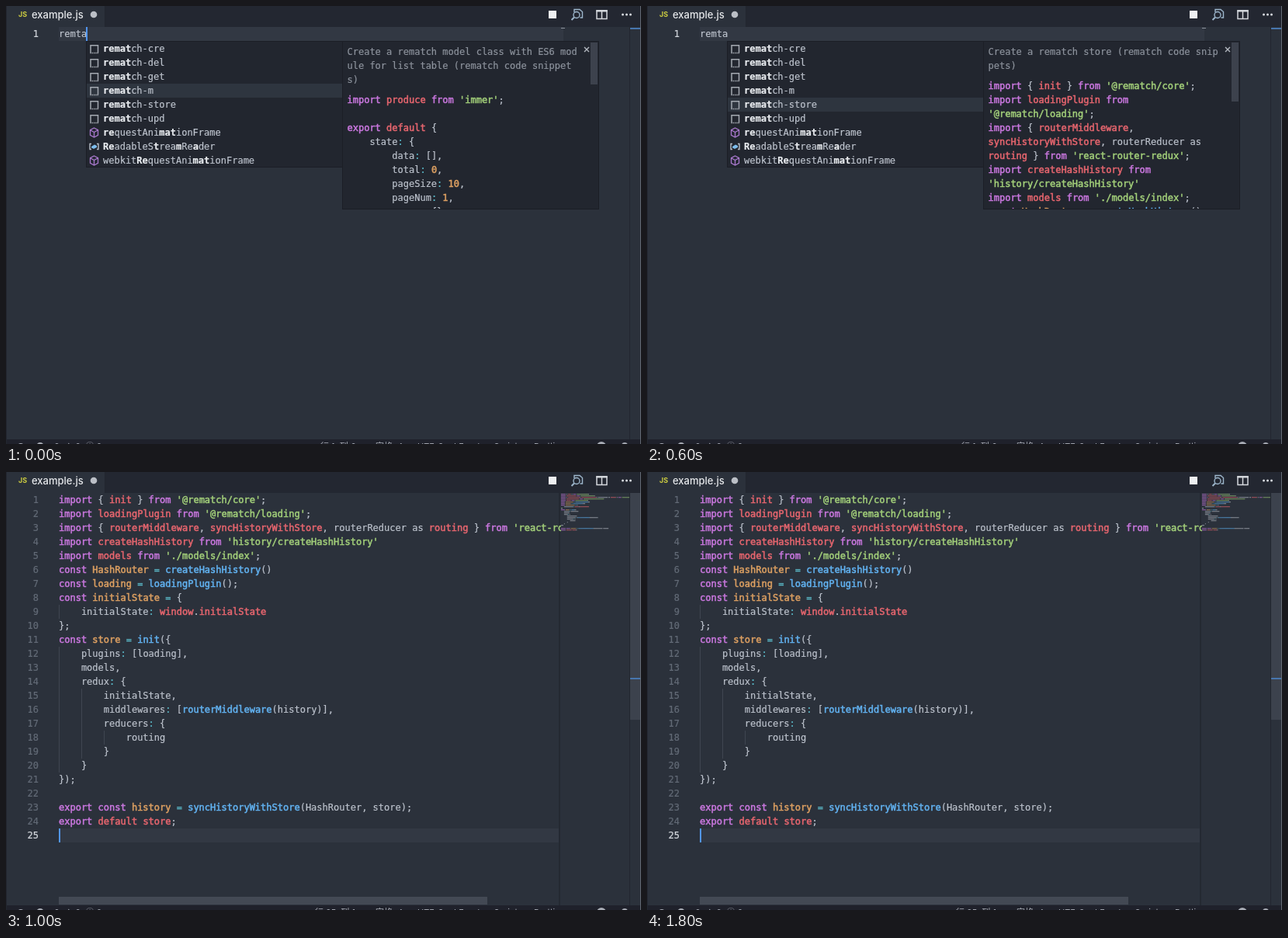
Animation, 818 px wide and 564 px high, one loop 1900 ms. Source, as an HTML page with a canvas:

```html
<!DOCTYPE html>
<html lang="en">
<head>
<meta charset="utf-8">
<title>Snippet completion</title>
<style>
  html, body { margin: 0; width: 100%; height: 100%; overflow: hidden; background: #2b313b; }
  #stage { position: relative; width: 818px; height: 564px; overflow: hidden; background: #2b313b; }
  #stage div, #stage svg, canvas, pre { position: absolute; margin: 0; }
  .layer { left: 0; top: 0; width: 818px; height: 564px; }
  pre {
    font: 12px/18px "DejaVu Sans Mono", monospace;
    color: #bdc3cd;
    -webkit-text-stroke: .2px;
  }
  .p { color: #cb78e0 } .r { color: #e8666f } .g { color: #a3d07a } .o { color: #dda062 }
  .b { color: #62b3f2 } .c { color: #5cbccb } .d { color: #8d939d }
  .p, .r, .g, .o, .b { -webkit-text-stroke: .5px; }
  .m { color: #e9ecf0; font-weight: 700 }

  #tabs { left: 127px; top: 0; width: 691px; height: 27px; background: #232731; }
  #name { left: 33px; top: 2px; font: 500 13px/18px Inter, sans-serif; color: #e6e8eb; }
  #kind { left: 16px; top: 2px; font: 700 9px/18px Inter, sans-serif; color: #cbcb41; }
  #status { left: 0; top: 558px; width: 818px; height: 6px; background: #1f212b; overflow: hidden; }
  .info { top: 560px; font: 11px/14px Inter, "Noto Sans CJK SC", "Noto Sans CJK", sans-serif; color: #a9adb6; white-space: pre; }

  .nums { left: 14px; width: 28px; top: 27px; text-align: right; color: #626a76; }
  .nums .now { color: #d3d7dd; }
  .line { left: 68px; height: 18px; background: #323843; }
  .caret { width: 2px; height: 18px; background: #5195ee; }
  .thumb { background: #434954; }
  .mark { left: 804px; width: 14px; height: 2px; background: #4776ae; }

  .box { background: #22262f; border: 1px solid #1b1e26; box-sizing: border-box; overflow: hidden; }
  #list { left: 103px; top: 45px; width: 331px; height: 163px; }
  #pick { left: 0; width: 329px; height: 18px; top: 54px; background: #2e353f; }
  #docs { left: 433px; top: 45px; width: 331px; height: 217px; }
  #docs pre { left: 5.5px; }
  #docs .thumb { left: 319px; top: 1px; width: 9px; background: #3d424d; }

  .layer, .caret, .late, .doc, #pick { animation: 1.9s step-end infinite; }
  .layer.typing { animation-name: typing; }
  .layer.result { animation-name: result; }
  #first { animation-name: first; }
  #second { animation-name: second; }
  #pick { animation-name: pick; }
  .late { animation-name: late; }
  #caret1 { animation-name: blink1; }
  #caret2 { animation-name: blink2; }
  @keyframes typing { 0% { opacity: 1 } 36.842%, 100% { opacity: 0 } }
  @keyframes result { 0% { opacity: 0 } 36.842%, 100% { opacity: 1 } }
  @keyframes first  { 0% { opacity: 1 } 5.263%, 100% { opacity: 0 } }
  @keyframes second { 0% { opacity: 0 } 5.263%, 100% { opacity: 1 } }
  @keyframes pick   { 0% { top: 54px } 5.263%, 100% { top: 72px } }
  @keyframes late   { 0% { opacity: 0 } 42.105%, 100% { opacity: 1 } }
  @keyframes blink1 { 0% { opacity: 1 } 31.578%, 100% { opacity: 0 } }
  @keyframes blink2 { 0% { opacity: 1 } 63.157% { opacity: 0 } 89.473%, 100% { opacity: 1 } }
</style>
</head>
<body>
<div id="stage">
  <div id="tabs"></div>
  <div id="kind">JS</div>
  <div id="name">example.js</div>
  <div id="status"></div>

  <div class="layer typing">
    <div class="line" style="top:27px; width:650px"></div>
    <pre class="nums" style="color:#d3d7dd">1</pre>
    <pre style="left:68px; top:27px">remta</pre>
    <div class="caret" id="caret1" style="left:103px; top:27px"></div>
    <div style="left:715px; top:28px; width:5px; height:1px; background:#8b919b"></div>
    <div class="mark" style="top:28px"></div>
    <div class="box" id="list">
      <div id="pick"></div>
      <pre id="names" style="left:21px; top:0"></pre>
      <svg id="icons" width="30" height="162" fill="none"></svg>
    </div>
    <div class="box" id="docs">
      <div class="doc" id="first">
        <pre id="about1" class="d" style="top:4px"></pre>
        <pre id="code1" style="top:66px"></pre>
        <div class="thumb" style="height:54px"></div>
      </div>
      <div class="doc" id="second">
        <pre id="about2" class="d" style="top:4px"></pre>
        <pre id="code2" style="top:48px"></pre>
        <div class="thumb" style="height:76px"></div>
      </div>
      <svg width="12" height="12" style="left:308px; top:4px">
        <path d="M3 3l6 6M9 3l-6 6" stroke="#b4b9c1" stroke-width="1.4"/>
      </svg>
    </div>
    <div class="info" style="left:405px">行 1, 列 6</div>
  </div>

  <div class="layer result">
    <div class="line" style="top:459px; width:644px"></div>
    <div style="left:712px; top:27px; width:2px; height:531px; background:#242932"></div>
    <svg width="200" height="564">
      <path d="M68.5 171v18M68.5 225v162M97.5 279v90M126.5 333v18" stroke="#3f4651"/>
    </svg>
    <pre class="nums" id="nums"></pre>
    <pre id="code" style="left:68px; top:27px; width:647px; overflow:hidden"></pre>
    <div class="caret" id="caret2" style="left:68px; top:459px"></div>
    <canvas id="map" width="89" height="60" style="left:715px; top:27px"></canvas>
    <div class="thumb late" style="left:804px; top:27px; width:14px; height:292px; background:#3c424d"></div>
    <div class="thumb late" style="left:68px; top:547px; width:552px; height:10px"></div>
    <div class="mark" style="top:265px"></div>
    <div class="info" style="left:398px">行 25, 列 1</div>
  </div>

  <svg width="818" height="564" fill="none">
    <path d="M.5 0v564M127.5 0v27M803.5 27v531" stroke="#22262f"/>
    <path d="M817.5 0v564" stroke="#636973"/>
    <circle cx="113" cy="11" r="4.3" fill="#bbbfc6"/>
    <rect x="699" y="6" width="10" height="10" fill="#eef0f2"/>
    <g stroke="#9db6cb" stroke-width="1.4">
      <path d="M732 8V4.500h7l3.500 3V15h-3"/>
      <circle cx="735" cy="11.500" r="4"/>
      <path d="M732 14.500L728.500 18" stroke-width="2"/>
    </g>
    <path d="M761 6h13v10.500h-13zM767.500 6v10" stroke="#d5d8dd" stroke-width="1.500"/>
    <path d="M760.300 6.300h14.400" stroke="#d5d8dd" stroke-width="2.400"/>
    <g fill="#d5d8dd">
      <circle cx="794.500" cy="11" r="1.500"/><circle cx="799.500" cy="11" r="1.500"/><circle cx="804.500" cy="11" r="1.500"/>
    </g>
    <g fill="#a9adb6">
      <circle cx="19" cy="568" r="5"/><circle cx="44" cy="567" r="5"/>
      <circle cx="767" cy="567" r="6"/><circle cx="797" cy="566" r="4"/>
    </g>
  </svg>

  <div class="info" style="left:62px">0  △ 0  ⓘ 0</div>
  <div class="info" style="left:476px">空格: 4</div>
  <div class="info" style="left:530px">UTF-8</div>
  <div class="info" style="left:577px">LF</div>
  <div class="info" style="left:604px">JavaScript</div>
  <div class="info" style="left:680px">Prettier</div>
</div>

<script>
const $ = id => document.getElementById(id);

// "^x" starts a run of text with class x; "^w" returns to plain.
function paint(id, src) {
  src.split('^').forEach((part, i) => {
    const span = document.createElement('span');
    if (i && part[0] !== 'w') span.className = part[0];
    span.textContent = i ? part.slice(1) : part;
    $(id).append(span);
  });
}

paint('names', `^mremat^wch-cre
^mremat^wch-del
^mremat^wch-get
^mremat^wch-m
^mremat^wch-store
^mremat^wch-upd
^mre^wquestAni^mmat^wionFrame
^mRe^wadableS^mt^wrea^mm^wRe^ma^wder
webkit^mRe^wquestAni^mmat^wionFrame`);

paint('about1', `Create a rematch model class with ES6 mod
ule for list table (rematch code snippet
s)`);
paint('code1', `^pimport ^rproduce ^pfrom ^g'immer'^w;

^pexport ^rdefault ^w{
    state^c: ^w{
        data^c: ^w[],
        total^c: ^o0^w,
        pageSize^c: ^o10^w,
        pageNum^c: ^o1^w,
        param^c: ^w{},`);

paint('about2', `Create a rematch store (rematch code snip
pets)`);
const head = `^pimport ^w{ ^rinit ^w} ^pfrom ^g'@rematch/core'^w;\n^pimport ^rloadingPlugin ^pfrom`;
const models = `^pimport ^rmodels ^pfrom ^g'./models/index'^w;
^pconst ^oHashRouter ^c= ^bcreateHashHistory^w()`;
paint('code2', `${head}
^g'@rematch/loading'^w;
^pimport ^w{ ^rrouterMiddleware^w,
^rsyncHistoryWithStore^w, routerReducer as
^rrouting ^w} ^pfrom ^g'react-router-redux'^w;
^pimport ^rcreateHashHistory ^pfrom
^g'history/createHashHistory'
${models}`);

paint('code', `${head} ^g'@rematch/loading'^w;
^pimport ^w{ ^rrouterMiddleware^w, ^rsyncHistoryWithStore^w, routerReducer as ^rrouting ^w} ^pfrom ^g'react-router-redux'^w;
^pimport ^rcreateHashHistory ^pfrom ^g'history/createHashHistory'
${models}
^pconst ^oloading ^c= ^bloadingPlugin^w();
^pconst ^oinitialState ^c= ^w{
    initialState^c: ^rwindow^w.^rinitialState^w
};
^pconst ^ostore ^c= ^binit^w({
    plugins^c: ^w[loading],
    models,
    redux^c: ^w{
        initialState,
        middlewares^c: ^w[^brouterMiddleware^w(history)],
        reducers^c: ^w{
            routing
        }
    }
});

^pexport const ^ohistory ^c= ^bsyncHistoryWithStore^w(HashRouter, store);
^pexport ^rdefault store^w;`);

for (let n = 1; n <= 25; n++) {
  const num = document.createElement('span');
  num.textContent = n + '\n';
  if (n === 25) num.className = 'now';
  $('nums').append(num);
}

// Completion icons: snippet, method, variable.
const snippet = `<path d="M5 14V4.8h9.5V14" stroke="#a4a9b1" stroke-width="1.5"/>
  <path d="M4.3 14.5h11" stroke="#a4a9b1" stroke-width="1.6" stroke-dasharray="1.5 .8"/>`;
const method = `<path d="M9.5 3l5 2.7v6.6l-5 2.7l-5-2.7V5.7zM4.5 5.7l5 2.8l5-2.8M9.5 8.5v6.5"
  stroke="#a878cc" stroke-width="1.3"/>`;
const variable = `<path d="M6 5.5H4v7h2M13 5.5h2v7h-2" stroke="#b5bcc6" stroke-width="1.4"/>
  <path d="M6 9l4-2.5l3 1.5v2l-4 2l-3-1.5z" fill="#7dbcec"/>`;
$('icons').innerHTML = [...Array(6).fill(snippet), method, variable, method]
  .map((icon, i) => `<g transform="translate(0 ${i * 18})">${icon}</g>`).join('');

// The minimap: one small dash per character.
const g = $('map').getContext('2d');
g.globalAlpha = .55;
let x = 0, y = 1;
for (const span of $('code').children) {
  g.fillStyle = getComputedStyle(span).color;
  for (const ch of span.textContent) {
    if (ch === '\n') { x = 0; y += 2; continue; }
    if (ch !== ' ') g.fillRect(x, y, 1, 1.3);
    x += .97;
  }
}
</script>
</body>
</html>
```
